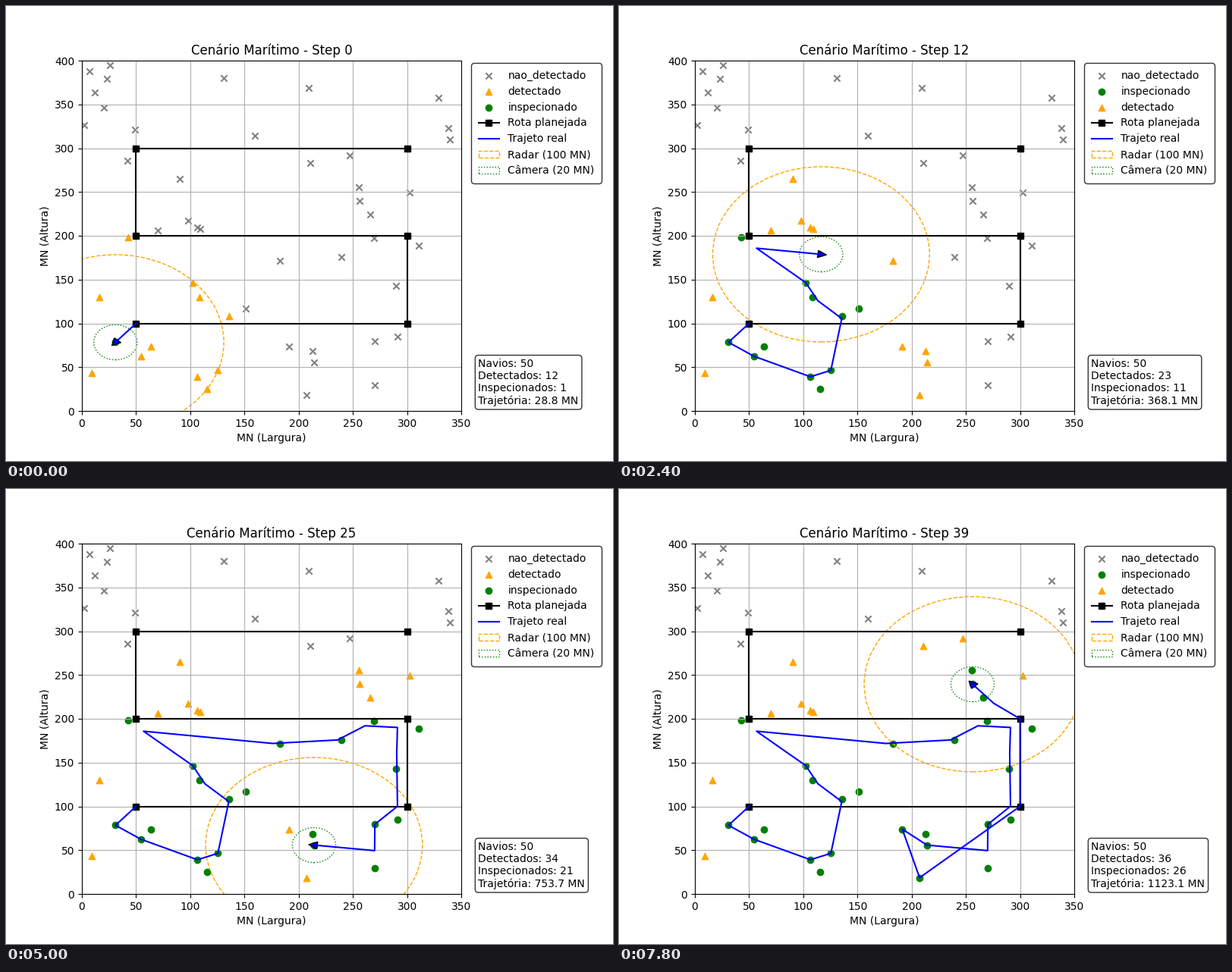
A matplotlib script that plays this animation: 800x600 px, repeating every 8 s.

```python
import numpy as np
import matplotlib.pyplot as plt
from matplotlib.animation import FuncAnimation

WIDTH, HEIGHT = 350, 400
STEPS = 40
SPEED, RADAR, CAMERA = 30, 100, 20
ROUTE = np.array([(50, 100), (300, 100), (300, 200), (50, 200), (50, 300), (300, 300)], float)
SHIPS = np.random.RandomState(42).rand(50, 2) * (WIDTH, HEIGHT)
STYLES = {
    "nao_detectado": ("gray", "x"),
    "detectado": ("orange", "^"),
    "inspecionado": ("green", "o"),
}


def near_leg(start, end):
    """Ships beside a route leg: radar range sideways, camera range past its ends."""
    length = np.linalg.norm(end - start)
    ux, uy = (end - start) / length
    dx, dy = (SHIPS - start).T
    along, across = dx * ux + dy * uy, dx * uy - dy * ux
    return (along >= -CAMERA) & (along <= length + CAMERA) & (abs(across) <= RADAR)


def sail():
    """Follow the route, turning off to the nearest detected ship of the leg."""
    pos, leg = ROUTE[0], 1
    path = [pos]
    nearest = [np.linalg.norm(SHIPS - pos, axis=1)]
    for _ in range(STEPS):
        seen = nearest[-1]
        todo = (seen <= RADAR) & (seen > CAMERA) & near_leg(ROUTE[leg - 1], ROUTE[leg])
        goal = ROUTE[leg]
        if todo.any():
            gap = np.linalg.norm(SHIPS - pos, axis=1)
            goal = SHIPS[np.where(todo, gap, np.inf).argmin()]
        dist = np.linalg.norm(goal - pos)
        pos = pos + (goal - pos) * min(1, SPEED / dist)
        if np.allclose(pos, ROUTE[leg]):
            leg += 1
        path.append(pos)
        nearest.append(np.minimum(seen, np.linalg.norm(SHIPS - pos, axis=1)))
    return np.array(path), np.array(nearest)


PATH, NEAREST = sail()
LENGTH = np.cumsum(np.linalg.norm(np.diff(PATH, axis=0), axis=1))

fig, ax = plt.subplots(figsize=(8, 6), dpi=100)
fig.subplots_adjust(left=0.125, right=0.75, bottom=0.11, top=0.88)


def draw(step):
    ax.clear()
    near = NEAREST[step + 1]
    state = np.where(near <= CAMERA, "inspecionado",
                     np.where(near <= RADAR, "detectado", "nao_detectado"))
    for name in dict.fromkeys(state.tolist()):
        color, marker = STYLES[name]
        ax.scatter(*SHIPS[state == name].T, c=color, marker=marker, label=name)

    track = PATH[:step + 2]
    pos = track[-1]
    ax.plot(*ROUTE.T, "k-s", label="Rota planejada")
    ax.plot(*track.T, "b-", label="Trajeto real")
    ax.add_patch(plt.Circle(pos, RADAR, color="orange", fill=False, ls="--",
                            label=f"Radar ({RADAR} MN)"))
    ax.add_patch(plt.Circle(pos, CAMERA, color="green", fill=False, ls=":",
                            label=f"Câmera ({CAMERA} MN)"))
    move = pos - track[-2]
    ax.arrow(*pos, *(5 * move / np.linalg.norm(move)), head_width=8, head_length=8,
             length_includes_head=True, fc="blue", ec="black")

    ax.set(xlim=(0, WIDTH), ylim=(0, HEIGHT), xlabel="MN (Largura)",
           ylabel="MN (Altura)", title=f"Cenário Marítimo - Step {step}")
    ax.grid(True)
    legend = ax.legend(loc="upper left", bbox_to_anchor=(1.02, 1), edgecolor="black")
    legend.get_frame().set_boxstyle("round", pad=0.3)

    stats = (f"Navios: {len(SHIPS)}\n"
             f"Detectados: {(near <= RADAR).sum()}\n"
             f"Inspecionados: {(near <= CAMERA).sum()}\n"
             f"Trajetória: {LENGTH[step]:.1f} MN")
    ax.text(1.045, 0.0133, stats, transform=ax.transAxes, va="bottom",
            bbox=dict(boxstyle="round", fc="white", ec="black", alpha=0.8))
    return []


anim = FuncAnimation(fig, draw, frames=STEPS, interval=200, repeat=True, repeat_delay=0)
plt.show()
```
